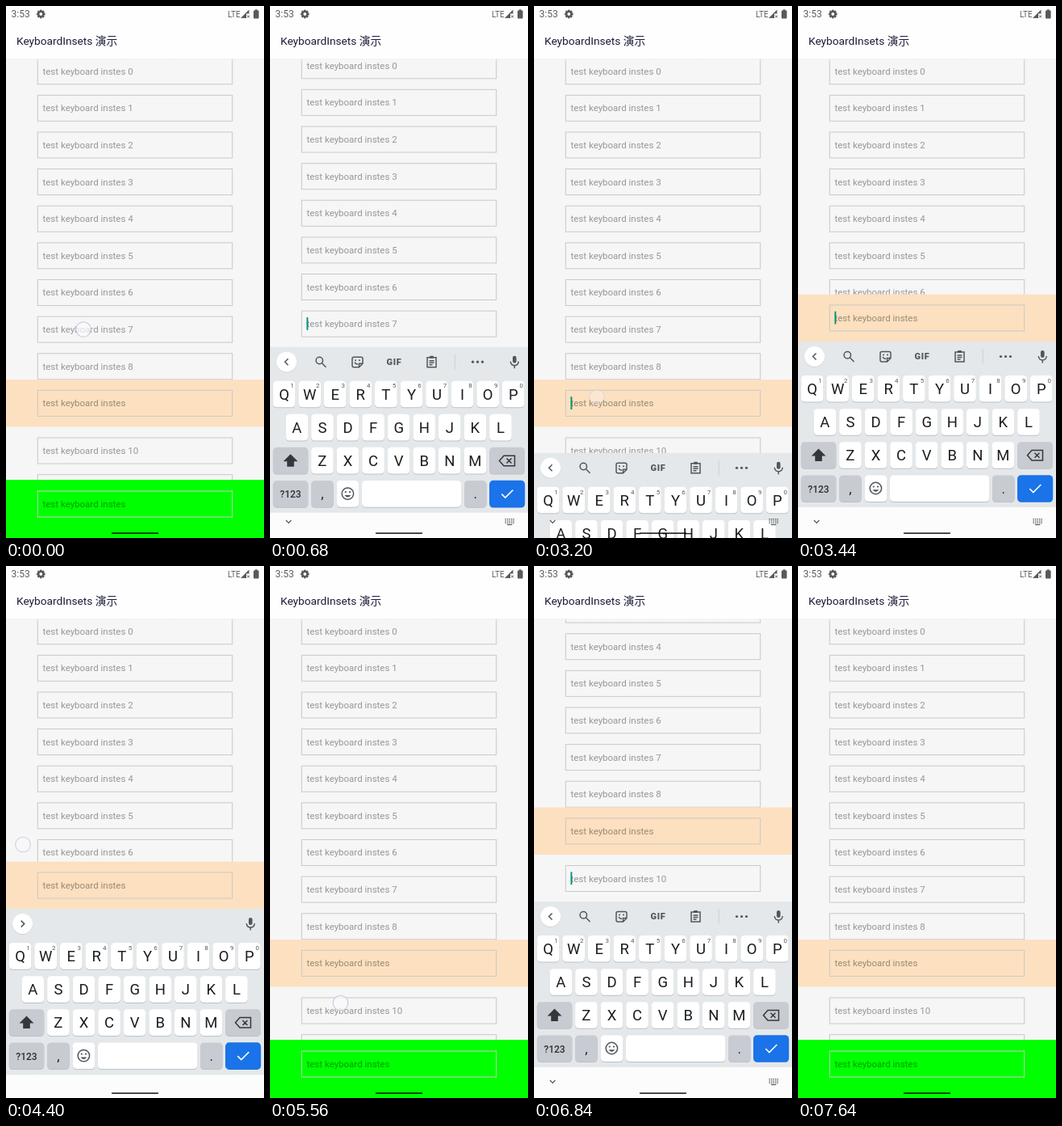
Recreate the animation shown at these times as an HTML page. Size 320x658 px, loop 8 s.

```html
<!DOCTYPE html>
<html lang="zh">
<head>
<meta charset="utf-8">
<title>KeyboardInsets 演示</title>
<style>
html, body { margin: 0; width: 100%; height: 100%; overflow: hidden; background: #fff; }
svg { display: block; width: 320px; height: 658px; }
text { font-family: Roboto, "Noto Sans CJK SC", "Noto Sans CJK", sans-serif; }
.hint { font-size: 11.5px; fill: #000; fill-opacity: .39; }
.box { fill: none; stroke: #c9c9ca; }
.mid { text-anchor: middle; }
.line { fill: none; stroke: #50565c; stroke-width: 1.5; }
.ink { fill: #50565c; }
</style>
</head>
<body>
<svg id="stage" viewBox="0 0 320 658" xmlns="http://www.w3.org/2000/svg"></svg>
<script>
const LOOP = 8000, SCREEN = 658, KB_TOP = 415, SLIDE = 285;
const PITCH = 45.63, FIRST = 80.7, BAND = 9, GAP = 12.5;

// tap and dismiss: [x, y, down, up]
const sessions = [
  { field: 7, tap: [96, 400, 0, 400], open: 471, off: 920, on: 1440, dismiss: [24, 389.5, 1560, 1760], close: 1839 },
  { field: 9, tap: [78, 483.5, 2840, 3080], open: 3151, off: 3640, on: 4120, dismiss: [21, 344.5, 4160, 4360], close: 4385 },
  { field: 10, tap: [87.5, 540.5, 5560, 5800], open: 5871, off: 6320, on: 6840, dismiss: [22, 350, 7120, 7240], close: 7353 }
];

const rect = (x, y, w, h, fill, r = 0) =>
  `<rect x="${x}" y="${y}" width="${w}" height="${h}" rx="${r}" fill="${fill}"/>`;
const label = (x, y, size, str, extra = 'class="mid" fill="#1c1d1f"') =>
  `<text x="${x}" y="${y}" font-size="${size}" ${extra}>${str}</text>`;
const path = (d, extra = 'class="line"') => `<path d="${d}" ${extra}/>`;
const circle = (x, y, r, extra) => `<circle cx="${x}" cy="${y}" r="${r}" ${extra}/>`;

const centre = i => FIRST + PITCH * i + (i > BAND ? 13 : 0);
const field = (y, n) =>
  `<rect class="box" x="39.3" y="${y - 16}" width="241.4" height="32"/>` +
  `<text class="hint" x="45.5" y="${y + 4}">test keyboard instes${n === undefined ? '' : ' ' + n}</text>`;

function listItems() {
  let s = '';
  for (let i = 0; i < 12; i++) if (i !== BAND) s += field(centre(i), i);
  const y = centre(BAND);
  return s + `<g id="band">${rect(0, y - 29.3, 320, 58.4, '#fce0bf')}${field(y)}</g>` +
    '<rect id="cursor" x="45.4" width="1.9" height="15.8" fill="#04937c"/>';
}

const key = (x, y, w, fill = '#fff', shadow = '#bcc1c5') =>
  rect(x, y + 1, w, 32.6, shadow, 4.5) + rect(x, y, w, 32.6, fill, 4.5);

function letters(str, x0, y, hints) {
  return [...str].map((c, i) => {
    const x = x0 + 31.57 * i;
    return key(x - 13.8, y, 27.6) + label(x, y + 22.9, 18.5, c) +
      (hints ? label(x + 10, y + 8.8, 8, (i + 1) % 10, 'class="mid" fill="#54585c"') : '');
  }).join('');
}

function toolbar() {
  const dots = [251.5, 257.5, 263.5].map(x => circle(x, 433.5, 1.6, 'class="ink"')).join('');
  return circle(20.5, 434.2, 12.6, 'fill="#c8ccd0"') + circle(20.5, 433.5, 12.5, 'fill="#fff"') +
    `<g id="wide">${path('M22.5 429.5l-4 4 4 4')}` +
    circle(61.3, 431.8, 4.2, 'class="line"') + path('M64.5 435l5 5') +
    path('M104 427.5h9q2 0 2 2v6l-4.5 4.5h-6.5q-2 0-2-2v-8.5q0-2 2-2zM115 435.5h-4.5v4.5M105 434q1.5 3 4 2') +
    circle(106, 431.5, 1, 'class="ink"') + circle(111, 431.5, 1, 'class="ink"') +
    label(154, 437.3, 11, 'GIF', 'class="mid ink" font-weight="800" letter-spacing=".7"') +
    path('M195 428h11v12h-11zM197.5 432h6M197.5 434.5h6M197.5 437h4') + rect(198, 426, 5, 3, '#50565c', 1) +
    rect(228.7, 424, 1, 19, '#cdd1d5') + dots + '</g>' +
    `<g id="narrow">${path('M18.7 429.5l4 4-4 4')}</g>` +
    rect(301, 426, 4.6, 9, '#50565c', 2.3) + path('M298.3 433q.5 5 5 5t5-5M303.3 438v3.5');
}

function keyboard() {
  const grey = '#c8ccd2', blue = '#1a73e8';
  return rect(0, KB_TOP, 320, 205.5, '#e4e8ea') + rect(0, 620, 320, 38.5, '#fcfcfd') + toolbar() +
    letters('QWERTYUIOP', 17.6, 457, true) +
    letters('ASDFGHJKL', 33.4, 498.2) +
    letters('ZXCVBNM', 64.9, 539.2) +
    key(3.8, 539.2, 43.5, grey) + path('M25.5 547.5l9 9h-4.7v6.5h-8.6v-6.5h-4.7z', 'fill="#34383c"') +
    key(272.2, 539.2, 43.7, grey) +
    path('M290 549.5h13.5v12.5h-13.5l-5.5-6.25zM293.5 552.8l6 6M299.5 552.8l-6 6', 'class="line" style="stroke:#34383c"') +
    key(3.8, 580.4, 43.5, grey) + label(25.5, 601.5, 12, '?123', 'class="mid" fill="#2c3034" font-weight="500"') +
    key(51.2, 580.4, 27.5, grey) + label(65, 602.5, 17, ',') +
    key(82.7, 580.4, 27.5) + circle(96.4, 596.5, 7.2, 'class="line"') +
    circle(93.8, 594.5, 1.1, 'class="ink"') + circle(99, 594.5, 1.1, 'class="ink"') +
    path('M92.5 598.3q3.9 5 7.8 0z', 'class="ink"') +
    key(114, 580.4, 123.3) + key(241, 580.4, 27.6, grey) + label(254.8, 602.5, 17, '.') +
    key(272.2, 580.2, 43.9, blue, blue) + path('M287.3 597l4.5 4.5 9.5-9.5', 'fill="none" stroke="#fff" stroke-width="1.6"');
}

function statusBar() {
  let teeth = '';
  for (let a = 0; a < 360; a += 45) teeth += `<rect x="42" y="4.7" width="2.6" height="3" transform="rotate(${a} 43.3 10)"/>`;
  return label(6.5, 14.3, 12, '3:53', 'fill="#5c5c5e"') +
    `<g fill="#59595b">${teeth}</g>` + circle(43.3, 10, 3, 'fill="none" stroke="#59595b" stroke-width="2.2"') +
    label(275, 13.6, 10, 'LTE', 'fill="#5c5c5e"') +
    path('M291 15l10.5-10.5v5h-3.5v5.5z', 'fill="#59595b"') +
    path('M299 11.5l3 3M302 11.5l-3 3', 'stroke="#59595b"') +
    rect(307, 5.5, 6.6, 10, '#59595b', 1) + rect(308.8, 4.4, 3, 2, '#59595b');
}

function navIcons() {
  let s = path('M19.8 636l3.3 3.3 3.3-3.3', 'class="line" style="stroke-width:1.2"');
  for (let r = 0; r < 3; r++)
    for (let c = 0; c < 5; c++) s += rect(291.5 + c * 2.5, 634 + r * 2.3, 1.4, 1.3, '#50565c');
  return s + rect(294, 640.9, 6.4, 1.2, '#50565c');
}

const stage = document.getElementById('stage');
stage.innerHTML =
  '<defs><linearGradient id="shade" x2="0" y2="1"><stop stop-color="#e9e9ea"/>' +
  '<stop offset="1" stop-color="#f6f6f7" stop-opacity="0"/></linearGradient></defs>' +
  rect(0, 0, 320, 658, '#f6f6f7') + `<g id="list">${listItems()}</g>` +
  rect(0, 586, 320, 72, '#00ff00') + field(616) +
  rect(0, 65, 320, 2, 'url(#shade)') + rect(0, 0, 320, 65.3, '#fefefe') + statusBar() +
  label(13, 48, 13.7, 'KeyboardInsets 演示', 'fill="#1b1c3a"') +
  `<g id="keys">${keyboard()}</g><g id="nav">${navIcons()}</g>` +
  rect(130.8, 651.2, 58.4, 1.7, 'rgba(0,0,0,.8)', .8) +
  '<circle id="touch" r="9.3" fill="#fafafc" fill-opacity=".72" stroke="#c5cadb" stroke-width="1.1"/>';

const el = {};
for (const id of ['list', 'band', 'cursor', 'keys', 'wide', 'narrow', 'nav', 'touch']) el[id] = document.getElementById(id);
const show = (node, on) => node.setAttribute('visibility', on ? 'visible' : 'hidden');
const shift = (node, y) => node.setAttribute('transform', `translate(0 ${y.toFixed(2)})`);

// cubic-bezier(.2, 0, 0, 1)
function ease(p) {
  if (p <= 0) return 0;
  if (p >= 1) return 1;
  let a = 0, b = 1;
  for (let i = 0; i < 24; i++) {
    const s = (a + b) / 2;
    if (.6 * s * (1 - s) ** 2 + s ** 3 < p) a = s; else b = s;
  }
  return 3 * a * a * (1 - a) + a ** 3;
}

function touchAlpha([, , down, up], t) {
  return t < down ? 0 : Math.max(0, Math.min(1, 1 - (t - up) / 200));
}

function draw(t) {
  const s = sessions.filter(k => t >= k.tap[2]).pop();
  const clear = s.dismiss[3];
  const lift = ease((t - s.open) / SLIDE) - ease((t - s.close) / SLIDE);
  const top = SCREEN - (SCREEN - KB_TOP) * lift;
  const banded = s.field === BAND;
  const y = centre(s.field);
  const pan = Math.min(0, banded ? top - (y + 29.1) : top - GAP - (y + 16));

  shift(el.list, banded ? 0 : pan);
  shift(el.band, banded ? pan : 0);
  shift(el.keys, top - KB_TOP);
  show(el.keys, lift > 0);

  const focused = t >= s.tap[3] && t < clear;
  el.cursor.setAttribute('y', y - 8.2 + (banded ? pan : 0));
  show(el.cursor, focused && (t < s.off || t >= s.on));
  show(el.wide, lift > 0 && t < clear);
  show(el.narrow, lift > 0 && t >= clear);
  show(el.nav, t >= s.open && t < clear);

  const tap = t < s.dismiss[2] ? s.tap : s.dismiss;
  el.touch.setAttribute('cx', tap[0]);
  el.touch.setAttribute('cy', tap[1]);
  el.touch.setAttribute('opacity', touchAlpha(tap, t));
}

const start = performance.now();
function tick() {
  draw((performance.now() - start) % LOOP);
  requestAnimationFrame(tick);
}
tick();
</script>
</body>
</html>
```
